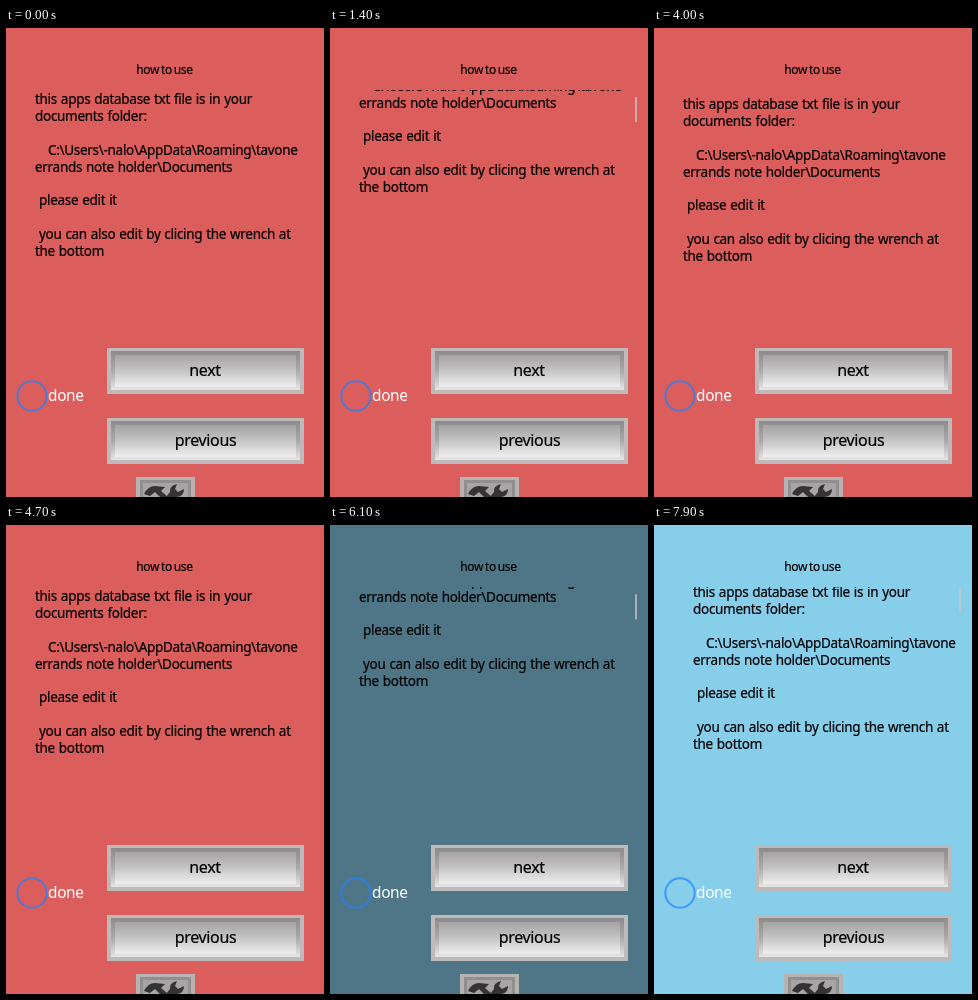
An HTML page that plays this animation: 318x469 px, repeating every 8 s.

```html
<!DOCTYPE html>
<html lang="en">
<head>
<meta charset="utf-8">
<title>how to use</title>
<style>
  html, body { margin: 0; height: 100%; overflow: hidden; }
  svg { display: block; width: 100vw; height: 100vh; }
  text { font-family: "Noto Sans", "Open Sans", sans-serif; letter-spacing: -.022em; word-spacing: .05em; }
  #page { font-size: 13.5px; }
  #page, .title, .label { stroke: #000; stroke-width: .2px; }
  .title { font-size: 12px; word-spacing: -.1em; text-anchor: middle; }
  .label { font-size: 16px; text-anchor: middle; }
  .pressed { fill: #fff; stroke: none; }
</style>
</head>
<body>
<svg viewBox="0 0 318 469">
  <defs>
    <linearGradient id="frame" x2="0" y2="1">
      <stop stop-color="#8c8a8a"/><stop offset=".5" stop-color="#aaa8a8"/><stop offset="1" stop-color="#e6e6e6"/>
    </linearGradient>
    <linearGradient id="face" x2="0" y2="1">
      <stop stop-color="#a4a2a2"/><stop offset=".5" stop-color="#c6c5c5"/><stop offset="1" stop-color="#efefef"/>
    </linearGradient>
    <clipPath id="view"><path d="M29 62H307V300H29z"/></clipPath>
    <g id="button">
      <path fill="#bebaba" d="M0 0H197V46H0z"/>
      <path fill="url(#frame)" d="M4 3H193V42H4z"/>
      <path fill="url(#face)" d="M8 7H189V39H8z"/>
    </g>
  </defs>

  <rect id="sky" width="318" height="469"/>
  <text class="title" x="158.5" y="46">how to use</text>

  <g clip-path="url(#view)">
    <g id="page">
      <text x="29" y="76">this apps database txt file is in your</text>
      <text x="29" y="93">documents folder:</text>
      <text x="42" y="127">C:\Users\-nalo\AppData\Roaming\tavone</text>
      <text x="29" y="144">errands note holder\Documents</text>
      <text x="33" y="177">please edit it</text>
      <text x="33" y="211">you can also edit by clicing the wrench at</text>
      <text x="29" y="228">the bottom</text>
    </g>
    <rect id="bar" x="305" width="2" height="25" fill="#c8c4c4"/>
  </g>

  <circle cx="26" cy="368" r="14.7" fill="none" stroke="#1e82ff" stroke-opacity=".72" stroke-width="2"/>
  <text x="42" y="373" font-size="15.4" fill="#fff">done</text>

  <use id="next" href="#button"/>
  <text id="nextLabel" class="label" x="199" y="348">next</text>
  <use href="#button" x="101" y="390"/>
  <text class="label" x="199.5" y="418">previous</text>

  <g transform="translate(130 449)">
    <path fill="#b6b2b2" d="M0 0H59V20H0z"/>
    <path fill="#908e8e" d="M4 3H55V20H4z"/>
    <path fill="#a6a4a4" d="M7 6H52V20H7z"/>
    <path fill="#333" d="M8 17Q12 9 19 9L29 10L25 14L32 20H24L19 15L14 19zM30 20L34 15Q33 9 41 7L39 12L42 15L48 12Q48 19 41 20z"/>
  </g>
</svg>

<script>
const LOOP = 8000, STEP = 100;
const get = id => document.getElementById(id);
const sky = get('sky'), page = get('page'), bar = get('bar'), next = get('next'), nextLabel = get('nextLabel');

const clamp = v => Math.min(1, Math.max(0, v));
const ramp = (t, start, length) => clamp((t - start) / length);
const easeOut = u => 1 - (1 - u) ** 3;
const bounce = (t, start, length) => Math.sin(Math.PI * ramp(t, start, length));

// Four short drags, a pull back to the top, a long fling, a reset and a last small drag.
function scrollAt(t) {
  const drags = ramp(t, 900, 200) + ramp(t, 1200, 200) + ramp(t, 1700, 400) + ramp(t, 2500, 400);
  const pull = ramp(t, 3500, 480);
  const fling = easeOut(ramp(t, 4800, 400)) - ramp(t, 5900, 400);
  return 32 * (4 * pull - drags) - 134 * fling - 4 * ramp(t, 7600, 300)
    + 72 * bounce(t, 300, 600) + 51 * bounce(t, 3980, 700);
}

function draw(now) {
  const t = Math.floor(now % LOOP / STEP) * STEP;

  const light = .15 + .85 * ramp(t, 5900, 400);
  sky.setAttribute('fill', t < 5900 ? '#db5e5c' : `rgb(${[135, 206, 235].map(c => Math.round(c * light))})`);

  const y = scrollAt(t);
  page.setAttribute('transform', `translate(${10 * ramp(t, 7600, 300)} ${y})`);

  // The bar shows while the page is scrolled and has moved lately.
  const moved = Math.abs(y - scrollAt(t - 300));
  bar.setAttribute('y', 62 - y * .11);
  bar.setAttribute('opacity', y < 0 ? .75 * clamp(moved / 4) : 0);

  const pressed = t >= 5900 && t < 6100;
  next.setAttribute('transform', pressed ? 'translate(101 364) scale(1 -1)' : 'translate(101 320)');
  nextLabel.classList.toggle('pressed', pressed);

  requestAnimationFrame(draw);
}
requestAnimationFrame(draw);
</script>
</body>
</html>
```
